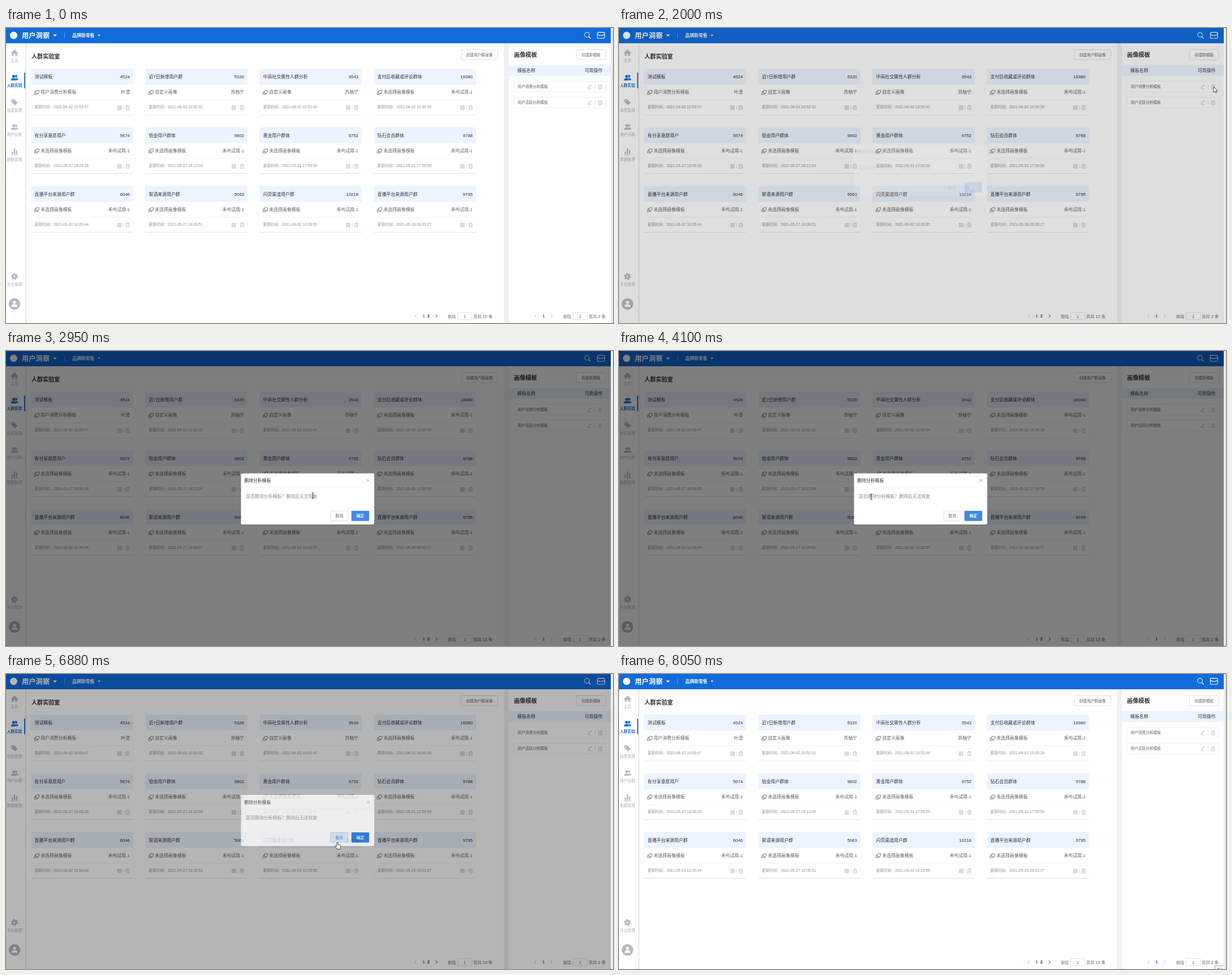
An HTML page that plays this animation: 1073x522 px, repeating every 8.08 s.

```html
<!DOCTYPE html>
<html>
<head>
<meta charset="utf-8">
<style>
html, body { margin: 0; width: 100%; height: 100%; overflow: hidden; background: #fff; }
svg { display: block; width: 100%; height: 100%; }
text { font-family: "Liberation Sans", "Noto Sans CJK SC", "Noto Sans CJK", sans-serif; white-space: pre; }
</style>
</head>
<body>
<svg id="stage" viewBox="0 0 1073 522"></svg>
<script>
const BLUE = '#116bdb', PALE = '#ebf4ff', INK = '#303133', MID = '#5c5e62', SOFT = '#8c8e92', ICON = '#b9bbbf';
const LOOP = 8080;

// ---- drawing helpers (text is placed by its vertical centre) ----
const text = (x, cy, str, size = 7.9, fill = INK, anchor = 'start', extra = '') =>
  `<text x="${x}" y="${cy + size * 0.37}" font-size="${size}" fill="${fill}" text-anchor="${anchor}" ${extra}>${str}</text>`;
const rect = (x, y, w, h, fill, extra = '') =>
  `<rect x="${x}" y="${y}" width="${w}" height="${h}" fill="${fill}" ${extra}/>`;
const path = (d, stroke, width = 0.8, extra = '') =>
  `<path d="${d}" fill="none" stroke="${stroke}" stroke-width="${width}" ${extra}/>`;
const shape = (d, fill, extra = '') => `<path d="${d}" fill="${fill}" ${extra}/>`;
const circle = (x, y, r, fill, extra = '') => `<circle cx="${x}" cy="${y}" r="${r}" fill="${fill}" ${extra}/>`;
const at = (x, y, body, extra = '') => `<g transform="translate(${x} ${y})" ${extra}>${body}</g>`;
const bold = 'font-weight="700"';
const outline = (color, extra = '') => `stroke="${color}" stroke-width=".8" rx="1" ${extra}`;
const button = (x, y, w, h, label, extra = '') =>
  rect(x, y, w, h, '#fff', outline('#d6d8dc', extra)) + text(x + w / 2, y + h / 2 + 0.2, label, 6.7, MID, 'middle');

// ---- icons, centred on 0,0 ----
const trash = path('M-3.5-2.6H3.5M-1.3-2.8V-4H1.3V-2.8M-2.8-2.4V3.6H2.8V-2.4M-1-.8V2.2M1-.8V2.2', ICON, 0.8);
const pencil = path('M-2.8 2.4L-2.3.6L2-3.6L3.2-2.4L-1-2L-1 1.9ZM-3.5 3.6H3.6', ICON, 0.7);
const grid = [[-3.5, -3.5], [0.5, -3.5], [-3.5, 0.5], [0.5, 0.5]]
  .map(([x, y]) => rect(x + 0.3, y + 0.3, 2.5, 2.5, 'none', `stroke="${ICON}" stroke-width=".8"`)).join('');
const layers = path('M-1.8-3.4H3.6V1.6H-1.8ZM-2-1.4H-3.8V3.6H1.8V1.8', '#75777b', 0.9, 'transform="skewX(-12)"');
const people = color =>
  circle(2.6, -2.6, 2.3, color) + shape('M1 4.2V2Q3 0 5.2 1Q6.6 1.9 6.5 4.2Z', color) +
  circle(-1.5, -2.4, 2.9, color, 'stroke="#fff" stroke-width=".6"') +
  shape('M-6.5 5Q-6.8 1.4-3 .6H0Q3.4 1.4 3.2 5Z', color, 'stroke="#fff" stroke-width=".5"');
const home = shape('M-6.5.3L0-6L6.5.3L5.6 1.2H4.6V5.5H1.5V2H-1.5V5.5H-4.6V1.2H-5.6Z', ICON);
const tag = shape('M-5.8-5.6H-.8L5.8.8L1 5.6L-5.8-1Z', ICON) + circle(-3.4, -3.2, 1, '#fff');
const bars = shape('M-5 4V-.5H-2.7V4ZM-1.2 4V-6H1.2V4ZM2.7 4V-3H5V4ZM-6.5 5H6.5V6H-6.5Z', ICON);
const gear = circle(0, 0, 3.2, 'none', `stroke="${ICON}" stroke-width="3.2"`) +
  circle(0, 0, 5.2, 'none', `stroke="${ICON}" stroke-width="2" stroke-dasharray="2.72 2.72"`);

// ---- page ----
const CARDS = [
  ['测试模板', 4524, '用户消费分析模板', '叶澄', '06-02 10:53:47'],
  ['近7日新增用户群', 5320, '自定义画像', '苏柚宁', '06-02 10:52:32'],
  ['中高社交属性人群分析', 3543, '自定义画像', '苏柚宁', '06-02 10:52:44'],
  ['支付后收藏或评论群体', 18380, '', '', '06-02 10:30:39'],
  ['有分享意愿用户', 5674, '', '', '05-27 18:09:28'],
  ['铂金用户群体', 9802, '', '', '05-27 18:12:04'],
  ['黄金用户群体', 9752, '', '', '05-31 17:59:59'],
  ['钻石会员群体', 9788, '', '', '05-31 17:59:59'],
  ['直播平台来源用户群', 6046, '', '', '06-02 10:26:44'],
  ['絮语来源用户群', 5063, '', '', '05-27 18:09:51'],
  ['闪荧渠道用户群', 10218, '', '', '06-02 10:29:55'],
  ['直播平台来源用户群', 9795, '', '', '05-28 09:33:27']
];

const card = ([title, count, template, owner, date], i) => at(44.2 + i % 4 * 202, 72 + Math.floor(i / 4) * 103.8,
  rect(0, 0, 180.6, 81.3, '#fff', 'rx="2" filter="url(#lift)"') +
  shape('M0 28V2Q0 0 2 0H178.6Q180.6 0 180.6 2V28Z', PALE) +
  text(6.3, 14, title) + text(174.8, 14, count, 7.9, INK, 'end') +
  at(10.3, 41.8, layers) +
  text(17, 41.5, template || '未选择画像模板', 7.9, MID) + text(174.8, 41.5, owner || '禾屿试用-1', 7.9, MID, 'end') +
  path('M6 55.3H175', '#ebedf0', 0.7) +
  text(6.3, 68, `更新时间：2021-${date}`, 6.7, SOFT) +
  at(156.5, 69, grid) + path('M163.8 65.5V72.5', '#d0d2d6', 0.7) + at(171, 69, trash));

const sideItem = (y, icon, label, color = '#aeb0b4', extra = '') =>
  at(15, y, icon) + text(15, y + 13.6, label, 6.7, color, 'middle', extra);

const template = (y, label, id) =>
  rect(898.4, y, 161.6, 18.6, '#fff', `id="${id}" ` + outline('#eceef1')) +
  text(904.5, y + 9.6, label, 6.7, MID) +
  at(1032, y + 9.8, pencil) + path(`M1041.2 ${y + 6}V${y + 13}`, '#c4c6ca', 0.7) + at(1050.3, y + 10, trash);

const chevron = (x, dir, color) => path(`M${x - dir * 1.5} 506.8L${x + dir * 1.5} 509.6L${x - dir * 1.5} 512.4`, color, 0.9);
const jump = (x, total) => text(x, 510, '前往', 7.3, MID) +
  rect(x + 17.6, 503.6, 25, 12.4, '#fff', outline('#d9dbe0')) + text(x + 30, 510, '1', 7.3, MID, 'middle') +
  text(x + 45, 510, `页共 ${total} 条`, 7.3, MID);

const header = rect(0, 0, 1069, 27, BLUE) +
  circle(13.5, 13, 6.5, '#fff') +
  text(28, 13, '用户洞察', 12.3, '#fff', 'start', 'font-weight="900"') +
  shape('M83 11.4H90L86.5 15Z', '#fff') + path('M103.5 8V18.5', '#6ea6ec', 0.8) +
  text(117, 13, '品牌新零售', 7.9, '#fff', 'start', bold) + shape('M162 11.8H167L164.5 14.4Z', '#fff') +
  circle(1027, 12, 4.2, 'none', 'stroke="#fff" stroke-width="1.1"') + path('M1030 15.2L1033.5 18.6', '#fff', 1.4) +
  rect(1045.3, 7.6, 13, 10.6, 'none', 'rx="1.8" stroke="#fff" stroke-width="1.1"') +
  path('M1045.5 11.2Q1051.8 15.4 1058.2 11.2', '#fff', 1.1);

const sidebar = rect(34, 27, 1.2, 495, '#e2e3e5') + rect(35.2, 27, 1.4, 495, '#f1f1f2') +
  sideItem(44, home, '主页') +
  sideItem(88, people(BLUE), '人群实验', BLUE, bold) + rect(32, 79, 1.8, 27.5, BLUE) +
  sideItem(131.5, tag, '标签管理') + sideItem(175.3, people(ICON), '用户分群') +
  sideItem(219, bars, '数据管理') + sideItem(439.7, gear, '平台管理') +
  circle(15, 488.3, 10.2, '#b5b8bd') + circle(15, 485.5, 2.8, '#fff') + shape('M9.6 493.4Q10 489.2 13 488.8H17Q20 489.2 20.4 493.4Z', '#fff');

const mainPanel = text(45, 50.3, '人群实验室', 10.1, INK, 'start', bold) +
  button(804.8, 38.4, 64.4, 17.4, '创建用户群画像') + CARDS.map(card).join('') +
  chevron(724, -1, '#b0b2b6') + text(738.5, 509.6, '1', 7.3, BLUE, 'middle', bold) +
  text(746.8, 509.6, '2', 7.3, INK, 'middle', bold) + chevron(761, 1, INK) + jump(781, 15);

const sidePanel = rect(880.3, 27, 8.7, 495, '#f0f1f2') +
  text(898, 47, '画像模板', 10.2, INK, 'start', bold) + button(1008.4, 38.4, 51.8, 17.4, '创建新模板') +
  rect(889, 65.5, 180, 19.5, PALE) + text(904, 75.2, '模板名称') + text(1054.5, 75.2, '可用操作', 7.9, INK, 'end') +
  template(94.4, '用户消费分析模板', 'row0') + template(122.4, '用户活跃分析模板', 'row1') +
  chevron(936, -1, '#b0b2b6') + text(950.3, 509.6, '1', 7.3, BLUE, 'middle', bold) + chevron(964.5, 1, '#b0b2b6') + jump(985, 2);

const question = (fill, extra = '') => text(424, 256.6, '是否删除分析模板？删除后无法恢复', 7.9, fill, 'start', extra);
const dialog = `<g id="dialog">` +
  rect(415.4, 216.6, 235.6, 90.4, '#fff', 'rx="2" filter="url(#lift)"') +
  text(421, 229.2, '删除分析模板') + path('M637.3 226.4L642.7 231.8M642.7 226.4L637.3 231.8', '#8f9196', 0.8) +
  path('M415.4 241H651', '#f0f1f3', 0.7) + question('#86888c') +
  `<g clip-path="url(#picked)">` + rect(424, 250, 126.4, 13.4, '#3390ff') + question('#fff') + `</g>` +
  rect(573.5, 283, 31, 17.4, '#fff', 'id="cancel" ' + outline('#d6d8dc')) +
  text(589, 292, '取消', 6.7, MID, 'middle', 'id="cancelLabel"') +
  rect(610.6, 282.7, 31.4, 18, BLUE, 'id="confirm" rx="1.4"') + text(626.3, 292, '确定', 6.7, '#fff', 'middle', bold) + `</g>`;

const edge = 'stroke="#222" stroke-width=".8" stroke-linejoin="round"';
const pointer = `<g id="pointer">` + circle(0, 0, 7, '#ffee3d', 'id="halo" opacity=".85"') +
  shape('M0 0V9.8L2.3 7.8L3.8 11L5.4 10.3L4 7.2H7Z', '#fff', `id="arrow" ${edge}`) +
  shape('M-1.1 1Q0-.7 1.1 1V4.4L4.3 5.2Q5.9 5.6 5.6 7.6L4.7 10.4V12.4H-1.3V11L-4.3 7.4Q-4.8 5.6-3.1 6.1L-1.1 7.6Z', '#fff', `id="hand" ${edge}`) +
  path('M-1.8-5H-.4L0-4.5L.4-5H1.8M0-4.5V4.5M-1.8 5H-.4L0 4.5L.4 5H1.8', '#222', 0.9, 'id="beam"') + `</g>`;

const tooltip = `<g id="tooltip">` + rect(1053.4, 516.5, 18, 12, '#fff', 'stroke="#8d8f93" stroke-width=".8"') +
  text(1057, 522.5, '停止', 6, MID) + `</g>`;

document.getElementById('stage').innerHTML = `<defs>
  <filter id="lift" x="-10%" y="-10%" width="120%" height="130%"><feDropShadow dx="0" dy=".8" stdDeviation=".7" flood-opacity=".14"/></filter>
  <clipPath id="picked"><rect id="pickedBox" x="424" y="248" width="0" height="18"/></clipPath>
  <clipPath id="view"><rect width="1069" height="522"/></clipPath></defs>` +
  `<g clip-path="url(#view)">` + rect(0, 0, 1069, 522, '#fefefe') + sidebar + mainPanel + sidePanel + header +
  rect(0, 0, 1069, 522, '#000', 'id="shade"') + dialog + tooltip + pointer + `</g>` + rect(1069, 0, 4, 522, '#ebebef');

// ---- motion ----
const el = id => document.getElementById(id);
const set = (id, attrs) => { for (const k in attrs) el(id).setAttribute(k, attrs[k]); };
const show = (id, on) => set(id, { visibility: on ? 'visible' : 'hidden' });
const clamp = v => Math.min(1, Math.max(0, v));
const smooth = v => v * v * (3 - 2 * v);

// The CSS "ease" curve: cubic-bezier(.25, .1, .25, 1)
function ease(x) {
  x = clamp(x);
  const bez = (a, b, s) => 3 * a * s * (1 - s) ** 2 + 3 * b * s * s * (1 - s) + s ** 3;
  let lo = 0, hi = 1;
  for (let i = 0; i < 24; i++) {
    const m = (lo + hi) / 2;
    if (bez(0.25, 0.25, m) < x) lo = m; else hi = m;
  }
  return bez(0.1, 1, lo);
}

const OPEN = 1965, CLOSE = 6830, PRESS = 4700;
// start, end, x, y
const MOVES = [
  [180, 990, 1052, 115], [1000, 1430, 1051, 104], [2200, 2850, 540, 255], [2900, 3390, 621, 287],
  [3410, 4100, 446, 258], [4290, PRESS, 424, 257], [4900, 5430, 552, 261], [5590, 5790, 561, 278],
  [6250, 6500, 586, 297.5], [6960, 7490, 1056, 526]
];
const CLICKS = [[1800, 1920], [PRESS, 5600], [5970, 6080], [6700, 6800]];

function pointerAt(t) {
  let x = 1053, y = 526;
  for (const [start, end, tx, ty] of MOVES) {
    const k = smooth(clamp((t - start) / (end - start)));
    x += (tx - x) * k;
    y += (ty - y) * k;
  }
  return [x, y];
}

function draw(t) {
  const [x, y] = pointerAt(t);
  const over = (l, top, r, b) => x >= l && x <= r && y >= top && y <= b;
  const modal = t >= OPEN && t < CLOSE + 300;

  const level = t < CLOSE ? ease((t - OPEN) / 300) : 1 - ease((t - CLOSE) / 300);
  const dim = t < CLOSE ? ease((t - OPEN) / 200) : 1 - ease((t - CLOSE) / 200);
  set('shade', { opacity: dim / 2 });
  set('dialog', { opacity: level, transform: `translate(0 ${-11.2 * (1 - level)})` });
  show('dialog', modal);

  const onCancel = modal && over(573, 283, 605, 301);
  const onConfirm = modal && over(610, 283, 642, 301);
  set('cancel', { fill: onCancel ? '#deeafa' : '#fff', stroke: onCancel ? '#a5c6f0' : '#d6d8dc' });
  set('cancelLabel', { fill: onCancel ? BLUE : MID });
  set('confirm', { fill: t < PRESS ? '#4189e2' : BLUE });
  set('pickedBox', { width: t >= PRESS && t < 6050 ? (t >= 5430 ? 127 : clamp((x - 424) / 126.4) * 126.4) : 0 });

  [94, 122].forEach((top, i) =>
    set('row' + i, { stroke: !modal && over(898, top, 1060, top + 19) ? '#dcdfe5' : '#eceef1' }));

  const hand = onCancel || onConfirm || (!modal && over(1046, 98, 1055, 110));
  const beam = modal && !hand && over(423, 249, 553, 264);
  show('hand', hand);
  show('beam', beam);
  show('arrow', !hand && !beam);
  show('halo', CLICKS.some(([a, b]) => t >= a && t < b));
  set('pointer', { transform: `translate(${x} ${y})` });

  show('tooltip', t >= 8010);
  set('tooltip', { opacity: t < 8050 ? 0.5 : 1 });
}

const begin = performance.now();
function tick() {
  draw((performance.now() - begin) % LOOP);
  requestAnimationFrame(tick);
}
tick();
</script>
</body>
</html>
```
